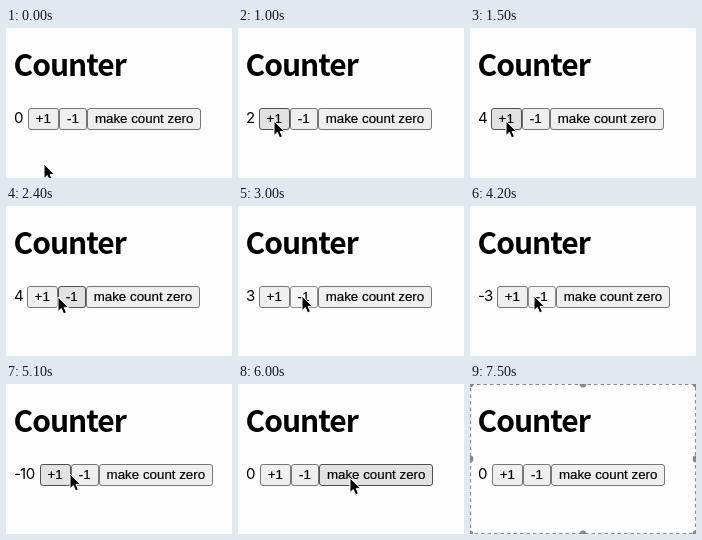
These frames come from a looping animation (226x150 px, 8.5 s). An HTML page:

```html
<!DOCTYPE html>
<html lang="en">
<head>
<meta charset="utf-8">
<title>Counter</title>
<style>
  html, body { margin: 0; width: 100%; height: 100%; overflow: hidden; background: #fdfdfd; }
  svg { display: block; width: 100vw; height: 100vh; }
  .title { font: 700 30px "Noto Sans CJK KR", "Noto Sans CJK JP", "Noto Sans", sans-serif; letter-spacing: -1px; }
  .count { font: 400 15px Inter, sans-serif; }
  .label { font: 13.333px "Liberation Sans", Arial, sans-serif; stroke: #000; stroke-width: .2px; }
</style>
</head>
<body>
<svg viewBox="0 0 226 150">
  <rect width="226" height="150" fill="#fdfdfd"/>
  <text class="title" x="7.5" y="48">Counter</text>
  <text class="count" id="count" y="94.5"></text>
  <g id="buttons"></g>
  <path id="cursor" d="M0 0V14.6L3.3 11.5L5.6 16.8L8.4 15.6L6.1 10.4H10.6Z"
        fill="#000" stroke="#fff" stroke-linejoin="round"/>
  <g id="selection">
    <rect x=".5" y=".5" width="225" height="149" fill="none" stroke="#8c8c8c" stroke-width="1.2" stroke-dasharray="3.5 3"/>
  </g>
</svg>
<script>
const NS = 'http://www.w3.org/2000/svg';
const LOOP = 8500, SELECT_AT = 7500, STEP = 100;
const $ = id => document.getElementById(id);

function add(parent, tag, attrs) {
  const el = document.createElementNS(NS, tag);
  for (const key in attrs) el.setAttribute(key, attrs[key]);
  return parent.appendChild(el);
}

const TOP = 80, LEFT = 8, SPACE = 4;
const advance = c => ({ '-': 6.05, 0: 9.8, 1: 5.65 })[c] || 8.6;
const LOOKS = {
  normal: ['#efefef', '#767676'],
  hover: ['#e2e2e2', '#4f4f4f'],
  pressed: ['#f5f5f5', '#8d8d8d']
};

const buttons = [['+1', 31.2], ['-1', 27.9], ['make count zero', 114.5]].map(([label, width]) => {
  const rect = add($('buttons'), 'rect', { y: TOP + 0.5, height: 21, rx: 2.5 });
  const text = add($('buttons'), 'text', { class: 'label', y: 95 });
  text.textContent = label;
  return { rect, text, width };
});

for (const x of [0, 113, 226])
  for (const y of [0, 75, 150])
    if (x !== 113 || y !== 75) add($('selection'), 'circle', { cx: x, cy: y, r: 3.4, fill: '#888' });

// Pointer glides, each easing from wherever the last one ended
const glides = [
  { from: 0, to: 300, x: 44, y: 33 },
  { from: 300, to: 600, x: 36, y: 93 },
  { from: 1600, to: 1900, x: 53, y: 95 },
  { from: 2300, to: 2400, x: 52, y: 91 },
  { from: 2400, to: 2600, x: 64, y: 90 },
  { from: 5200, to: 5500, x: 112, y: 94 },
  { from: 6200, to: 6400, x: 120, y: 123 }
];

// Runs of clicks; the mouse is down for one step before each change
const runs = [
  { at: 700, n: 1, add: 1 },
  { at: 1000, n: 2, every: 200, add: 1 },
  { at: 1500, n: 1, add: 1 },
  { at: 2800, n: 2, every: 300, add: -1 },
  { at: 3500, n: 4, every: 200, add: -1 },
  { at: 4200, n: 7, every: 100, add: -1 },
  { at: 5100, n: 1, add: -1 },
  { at: 5900, n: 1, add: 10 }
];
const clicks = runs.flatMap(({ at, n, every = 0, add }) =>
  Array.from({ length: n }, (_, i) => ({ time: at + i * every, add })));

const ease = p => p * p * (3 - 2 * p);

function pointerAt(t) {
  let x = 38, y = 136;
  for (const g of glides) {
    const p = ease(Math.min(1, Math.max(0, (t - g.from) / (g.to - g.from))));
    x += (g.x - x) * p;
    y += (g.y - y) * p;
  }
  return [x, y];
}

const countAt = t => clicks.reduce((sum, c) => c.time <= t ? sum + c.add : sum, 0);
const downAt = t => clicks.some(c => t < c.time && t >= c.time - STEP);

function drawCount(count) {
  let x = LEFT;
  const chars = [...String(count)];
  const starts = chars.map(c => { const at = x; x += advance(c); return at; });
  $('count').setAttribute('x', starts.join(' '));
  $('count').textContent = chars.join('');
  return x + SPACE;
}

function drawButtons(x, px, py, down) {
  for (const { rect, text, width } of buttons) {
    const left = Math.round(x), right = Math.round(x + width);
    const over = px >= left && px < right && py >= TOP && py < TOP + 22;
    const [fill, stroke] = LOOKS[over ? (down ? 'pressed' : 'hover') : 'normal'];
    rect.setAttribute('x', left + 0.5);
    rect.setAttribute('width', right - left - 1);
    rect.setAttribute('fill', fill);
    rect.setAttribute('stroke', stroke);
    text.setAttribute('x', x + 8);
    x += width;
  }
}

function render(time) {
  const t = Math.floor(time / STEP) * STEP;
  const [px, py] = pointerAt(t);
  const selecting = t >= SELECT_AT;
  drawButtons(drawCount(countAt(t)), px, py, downAt(t));
  $('cursor').setAttribute('transform', `translate(${px} ${py})`);
  $('cursor').style.display = selecting ? 'none' : '';
  $('selection').style.display = selecting ? '' : 'none';
}

const start = performance.now();
function tick() {
  render((performance.now() - start) % LOOP);
  requestAnimationFrame(tick);
}
tick();
</script>
</body>
</html>
```
